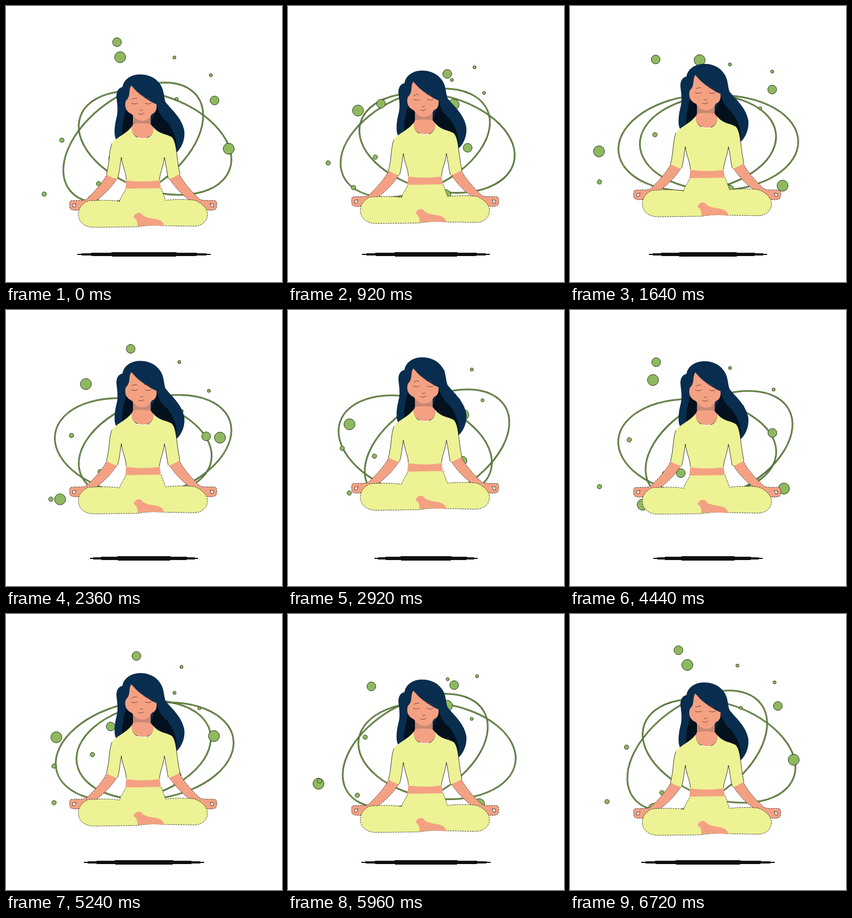
Write an HTML page that moves like this. It is 500 px wide and 500 px high and loops after 6760 ms.

```html
<!DOCTYPE html>
<html lang="en">
<head>
<meta charset="utf-8">
<title>Meditation</title>
<style>
  html, body { margin: 0; width: 100%; height: 100%; overflow: hidden; background: #fff; }
  svg { display: block; width: 100vw; height: 100vh; }
  .ring { fill: none; stroke: #26381a; stroke-width: 2.8; }
  .ring + .ring { stroke: #86b352; stroke-width: 1.3; }
  .dot { fill: #8fb95f; stroke: #26381a; stroke-width: 1; vector-effect: non-scaling-stroke; }
  .edge { stroke: #1c1c1c; stroke-width: .8; stroke-dasharray: 3 1.5; }
  .skin { fill: #f4a183; }
  .cloth { fill: #edf294; }
  .hair { fill: #082d4e; }
  .dark { fill: #03111e; }
  .line { fill: none; stroke: #6b3a35; stroke-width: .9; stroke-linecap: round; }
</style>
</head>
<body>
<svg viewBox="0 0 500 500">
  <ellipse id="shadow" cx="250" cy="450" ry="4" fill="#100e10" shape-rendering="crispEdges"/>
  <g id="rings"></g>
  <g id="dots"></g>
  <g id="woman">
    <path class="hair" d="M240 124C256 123 270 129 278 140C287 151 285 163 289 174C299 187 319 203 323 226C325 243 317 259 308 266L250 236L201 244C194 236 197 215 200 203C204 190 201 175 200 164C200 154 204 148 211 147C213 133 226 125 240 124Z"/>
    <path class="dark" d="M217 187C214 203 208 222 211 240L232 222V196ZM272 178C273 192 262 204 262 218L298 240L308 266C312 247 305 226 292 210C281 202 277 192 272 178Z"/>
    <path class="skin" d="M230 192H262V214L267 220C270 246 225 246 228 219L230 214Z"/>
    <path d="M230 200H262V214Q246 211 230 214Z" fill="#c88973"/>
    <path class="skin" d="M227 144C221 153 227 163 217 172C214 183 218 192 228 196C233 203 239 208 247 208C255 208 261 203 264 196C273 193 274 184 272 175C259 173 240 161 227 144Z"/>
    <path class="hair" d="M229 145C240 157 258 173 273 178L283 160L262 140Z"/>
    <path d="M230 147Q238 158 252 166" fill="none" stroke="#b77768" stroke-width=".8"/>
    <path class="line" d="M227 176Q233 179 238 176M252 176Q257 179 263 176M228 169Q232 166 237 167M252 167Q257 166 262 169M243 189Q246 191 248 188M240 195Q245 198 250 194"/>

    <g id="armL">
      <path class="skin edge" d="M183 304C178 317 160 337 146 350C139 354 126 351 117 353C114 357 115 364 117 368C123 371 132 371 139 367C158 358 183 341 201 313Z"/>
      <path d="M121 359L127 358L125 364L121 364Z" fill="#fff" stroke="#222" stroke-width=".8"/>
    </g>
    <use href="#armL" transform="matrix(-1 0 0 1 497 0)"/>

    <path class="skin" d="M218 312H278L281 334H216Z"/>
    <path class="cloth" d="M217 331Q249 333 281 330L289 353L206 354Z"/>
    <path class="cloth edge" d="M281 330C284 338 287 347 289 352C307 350 331 350 342 352C355 357 365 367 365 377C365 391 354 399 340 399L287 398Q262 396 238 400L160 401C142 401 131 391 131 377C131 366 139 357 149 353C166 352 188 351 206 354C207 346 214 340 217 331"/>
    <path class="skin" d="M231 383C233 376 241 372 246 377C252 386 271 384 280 389C285 392 287 397 286 399Q262 396 238 399C239 392 237 386 231 383Z"/>
    <path class="cloth" d="M228 218C225 248 270 248 267 219C275 232 293 232 301 238C310 248 308 272 315 304Q304 311 294 314C291 301 290 286 287 274C285 291 279 302 278 316Q248 320 218 316C218 303 211 291 209 275C206 290 206 301 202 314Q191 311 182 305C188 284 186 263 192 249C199 238 217 233 228 218Z"/>
    <path d="M209 274C206 290 206 301 202 313M209 274C211 291 218 303 218 315M287 274C290 286 291 301 294 313M287 274C285 291 279 302 278 315M301 238C310 248 308 272 315 304M182 305C188 284 186 263 192 249" fill="none" stroke="#151515" stroke-width=".8"/>
  </g>
</svg>
<script>
const LOOP = 6760;
const TAU = 2 * Math.PI;
const byId = id => document.getElementById(id);

function make(tag, parent, attrs) {
  const el = document.createElementNS('http://www.w3.org/2000/svg', tag);
  for (const name in attrs) el.setAttribute(name, attrs[name]);
  return parent ? parent.appendChild(el) : el;
}

// Two orbits that swing in opposite directions.
const orbits = [
  { x: 230.5, y: 248, swing: -28, lag: -0.08 },
  { x: 270, y: 248, swing: 28, lag: 0.2 }
].map(orbit => {
  const group = make('g', byId('rings'));
  for (let i = 0; i < 2; i++) make('ellipse', group, { class: 'ring', rx: 143.5, ry: 86 });
  return { ...orbit, group };
});

// Three-lobed closed track, followed at constant speed by every dot.
const knots = [
  [201, 65], [237, 76], [291, 124], [351, 140], [378, 172], [365, 225],
  [324, 258], [307, 296], [275, 344], [219, 320], [195, 279], [195, 235],
  [188, 199], [170, 179], [152, 139], [155, 97], [174, 74]
];

function smoothLoop(points) {
  const at = i => points[(i + points.length) % points.length];
  const handle = (i, side) => at(i).map((v, k) => v + side * (at(i + 1)[k] - at(i - 1)[k]) / 6);
  return 'M' + points[0] + points.map((_, i) =>
    'C' + [handle(i, 1), handle(i + 1, -1), at(i + 1)].join(' ')).join('') + 'Z';
}

const track = make('path', null, { d: smoothLoop(knots) });
const trackLength = track.getTotalLength();

const offsets = [0, 0.272, 0.683];
const dots = [
  'translate(230.5 247.5) rotate(-109) scale(1.25 -1.25)',
  'translate(115 291) rotate(20) scale(.488 -.488)',
  'translate(328 137.2) rotate(-5) scale(.357)',
  'translate(254.5 193.5)'
].flatMap(place => {
  const group = make('g', byId('dots'), { transform: place + ' translate(-254.5 -193)' });
  return offsets.map(offset => ({ offset, el: make('circle', group, { class: 'dot', r: 8 }) }));
});

function draw(time) {
  const turn = (time % LOOP) / LOOP;
  const phase = turn * TAU;
  const wave = Math.cos(phase);

  byId('woman').setAttribute('transform', `translate(0 ${20 * (wave - 1)})`);
  byId('shadow').setAttribute('rx', 107.5 + 14.5 * wave);

  for (const { x, y, swing, lag, group } of orbits) {
    const angle = -8 + swing * Math.cos(phase - lag);
    group.setAttribute('transform', `translate(${x} ${y}) rotate(${angle})`);
  }
  for (const { offset, el } of dots) {
    const p = track.getPointAtLength(trackLength * ((turn + offset) % 1));
    el.setAttribute('cx', p.x);
    el.setAttribute('cy', p.y);
  }
}

const start = performance.now();
function tick() {
  draw(performance.now() - start);
  requestAnimationFrame(tick);
}
draw(0);
requestAnimationFrame(tick);
</script>
</body>
</html>
```
